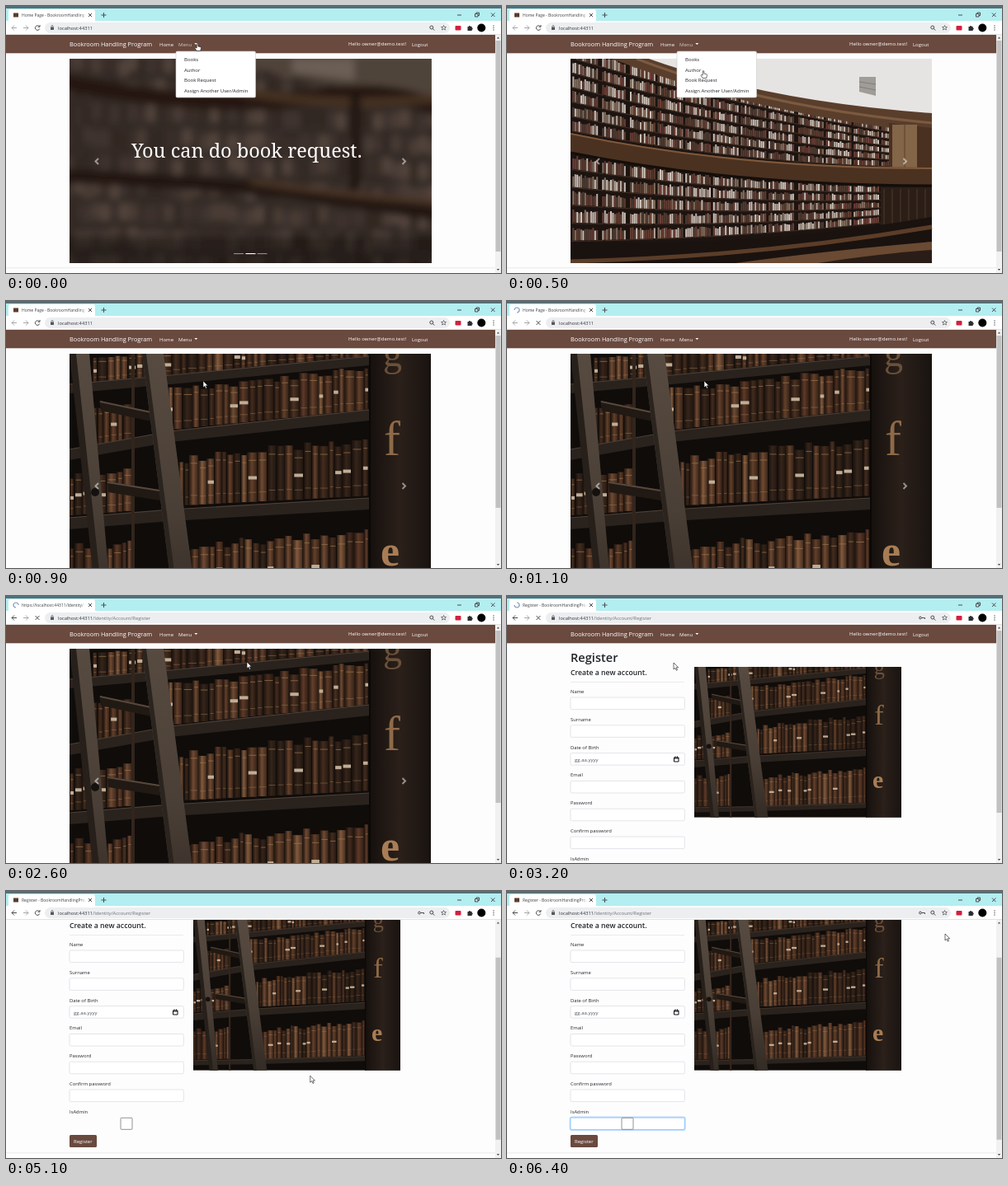
Animation, 600 px wide and 324 px high, one loop 6500 ms. Source, as an HTML page:

```html
<!DOCTYPE html>
<html lang="en">
<head>
<meta charset="utf-8">
<title>Library site</title>
<style>
  html, body { margin: 0; width: 100%; height: 100%; overflow: hidden; background: #fff; }
  svg { display: block; width: 100vw; height: 100vh; }
  text { font-family: "Open Sans", "Noto Sans", sans-serif; white-space: pre; }
  .serif { font-family: "Noto Serif", serif; }
  .gilt { font-family: "Liberation Serif", serif; }
  .field { fill: #fff; stroke: #ced4da; stroke-width: .6; }
  .icon { fill: none; stroke: #4a4d51; stroke-width: 1; }
</style>
</head>
<body>
<svg id="stage" viewBox="0 0 600 324" preserveAspectRatio="none"></svg>
<script>
const LOOP = 6500, STEP = 100;
const BRAND = 'Bookroom Handling Program';
const TAB_BRAND = BRAND.replace(/ /g, '');

const random = seed => () => (seed = seed * 16807 % 2147483647) / 2147483647;
const rect = (x, y, w, h, fill, more = '') =>
  `<rect x="${x}" y="${y}" width="${w}" height="${h}" fill="${fill}" ${more}/>`;
const path = (d, fill, more = '') => `<path d="${d}" fill="${fill}" ${more}/>`;
const line = (d, color, width, more = '') =>
  path(d, 'none', `stroke="${color}" stroke-width="${width}" ${more}`);
const text = (x, y, size, str, fill = '#212529', more = '') =>
  `<text x="${x}" y="${y}" font-size="${size}" fill="${fill}" ${more}>${str}</text>`;

// A row of leather spines standing on a sloping shelf.
function spines(seed, x0, y0, x1, y1, h0, h1) {
  const rnd = random(seed);
  const tones = ['#63402b', '#704a33', '#4b3122', '#35251b', '#835a3d', '#5d3a28', '#432c1f'];
  let out = '', x = x0;
  while (x < x1 - 3) {
    const w = Math.min(6 + rnd() * 7, x1 - x), u = (x - x0) / (x1 - x0);
    const base = y0 + (y1 - y0) * u;
    const h = (h0 + (h1 - h0) * u) * (.84 + rnd() * .16);
    out += rect(x, base - h, w - 1, h, tones[rnd() * tones.length | 0]);
    out += rect(x, base - h, w - 1, h, 'url(#round)');
    out += rect(x + 1.5, base - h * .85, w - 3, 1, '#9a7850', 'opacity=".7"');
    out += rect(x + 1.5, base - h * .2, w - 3, 1, '#9a7850', 'opacity=".5"');
    if (rnd() < .25) out += rect(x + 1, base - h * .52, w - 2, 4, '#bfae96');
    x += w;
  }
  return out;
}

function shelf(y0, mid, y1, depth) {
  return path(`M0 ${y0}L123 ${mid}L364 ${y1}v${depth}L123 ${mid + depth}L0 ${y0 + depth}z`, '#2a221d')
    + line(`M0 ${y0}L123 ${mid}L364 ${y1}`, '#4c4037', 1.2);
}

function ladderPhoto() {
  return rect(0, 0, 438, 319, '#0f0c0a')
    + spines(11, 28, 34, 363, 2, 32, 30) + shelf(37, 26, 3, 11)
    + spines(21, 28, 110, 76, 103, 46, 48) + spines(22, 120, 92, 363, 67, 52, 54) + shelf(116, 94, 68, 13)
    + spines(31, 0, 196, 76, 190, 52, 54) + spines(32, 133, 184, 363, 172, 60, 76) + shelf(199, 189, 175, 14)
    + spines(41, 0, 296, 76, 294, 66, 68) + spines(42, 133, 295, 363, 287, 64, 80) + shelf(298, 296, 289, 10)
    + rect(75, 0, 4, 319, '#32251c')
    + rect(363, 0, 75, 319, 'url(#post)') + rect(363, 0, 2, 319, '#0b0807')
    + text(380, 15, 46, 'g', '#6a503a', 'class="gilt"')
    + text(381, 123, 60, 'f', '#8f6a48', 'class="gilt"')
    + text(377, 257, 52, 'e', '#a87d55', 'class="gilt" font-weight="bold"')
    + path('M36 57L122 75V87L38 69z', '#211913') + line('M37 58L122 76', '#57483c', 2)
    + path('M46 155L134 169V182L47 168z', '#211913') + line('M46 156L134 170', '#57483c', 2)
    + path('M0 0H24L52 319H34z', '#261f1a') + path('M8 0H24L52 319H42z', 'url(#rail)')
    + path('M88 0H114L156 319H128z', 'url(#rail)') + path('M88 0H93L134 319H128z', '#2b241e')
    + '<circle cx="31" cy="168" r="5" fill="#15110e"/>';
}

// Thin spines of one curved bookcase, grouped into one path per tone.
function bank(seed, rows, xEnd, top, bottom) {
  const rnd = random(seed);
  const tones = ['#b9aca3', '#85705f', '#5f3d30', '#cdc2b8', '#6d3f38', '#4f3d33'];
  const strokes = tones.map(() => '');
  let boards = '';
  for (let r = 0; r < rows; r++) {
    const level = (x, k) => top(x) + (bottom(x) - top(x)) * k / rows;
    for (let x = 1; x < xEnd; x += 2.4) {
      const y = level(x, r + .93), h = (level(x, r + 1) - level(x, r)) * (.55 + rnd() * .22);
      if (x % 34 > 3) strokes[rnd() * tones.length | 0] += `M${x.toFixed(1)} ${y.toFixed(1)}v${(-h).toFixed(1)}`;
      if (x % 20 < 2.4) boards += `M${x} ${level(x, r + .97)}L${x + 20} ${level(x + 20, r + .97)}`;
    }
  }
  return line(boards, '#3f2a1e', 1.2) + strokes.map((d, i) => line(d, tones[i], 2)).join('');
}

function hallPhoto() {
  const arc = (left, right, sag) => x => {
    const u = x / 438;
    return left + (right - left) * u + sag * u * (1 - u);
  };
  const top = arc(-18, 90, 30), mid = arc(88, 132, 40), low = arc(113, 154, 40), floor = arc(222, 192, 24);
  return rect(0, 0, 438, 248, '#1c1411')
    + bank(5, 6, 386, top, mid) + bank(9, 5, 374, low, floor)
    + path('M50 0H438V90Q220 66 50 0z', '#5a3e2c') + path('M95 0H438V66Q240 52 95 0z', '#e6e4e3')
    + line('M80 0Q230 58 438 78', '#7b5a40', 3)
    + path('M350 22h20v23l-20-5z', '#a09c98') + line('M350 28l20 3M350 34l20 4', '#817d79', 1)
    + path('M386 78L438 84V134H386z', '#4a3020') + path('M390 80h30v52h-30z', '#836548')
    + line('M405 80v52', '#5b412d', 1)
    + path('M0 90Q200 132 438 132V154Q200 154 0 114z', '#4b3120')
    + line('M0 91Q200 133 438 133', '#7d583b', 2) + line('M0 114Q200 154 438 154', '#140e0b', 3)
    + path('M376 156H438V210H376z', '#2b1e17')
    + line('M380 158v46M390 158v46M400 158v46M410 158v46M420 158v46M430 158v46', '#4d392c', 1)
    + path('M0 222Q220 230 438 192V248H0z', '#1a120f')
    + line('M0 246Q230 240 438 204', '#5b3d28', 5)
    + path('M200 248Q300 234 438 222V240L330 248z', '#6a4a33')
    + path('M300 248Q380 236 438 232V248z', '#2a1d17');
}

function blurPhoto() {
  const rnd = random(77);
  const tones = ['#4f403a', '#5c4b43', '#3d302c', '#66544b', '#463833'];
  let out = rect(-20, -20, 480, 290, '#41342f');
  for (let y = -8; y < 248; y += 30)
    for (let x = -6; x < 438; x += 11)
      out += rect(x, y + x * .02 + rnd() * 8, 11, 20, tones[rnd() * tones.length | 0]);
  out += path('M225 -10H460V45Q320 38 225 10z', '#635448')
    + path('M270 0H345V26L270 16z', '#85766a')
    + line('M-10 28Q180 64 290 47T460 68', '#2e1f17', 20)
    + line('M210 40Q330 62 460 46', '#573c2a', 11)
    + line('M-10 142Q210 152 300 166T460 190', '#2b1d17', 17)
    + line('M220 149Q330 166 460 175', '#5a3f2d', 7)
    + rect(340, 45, 13, 115, '#2a1e19')
    + rect(-20, 215, 480, 50, '#1d1613', 'opacity=".5"');
  return `<g filter="url(#soft)">${out}</g>` + rect(0, 0, 438, 248, '#000', 'opacity=".2"')
    + text(75, 120, 23.5, 'You can do book request.', '#fff', 'class="serif"')
    + rect(199, 236, 12, 1.1, '#fff', 'opacity=".5"') + rect(213.5, 236, 12, 1.1, '#fff')
    + rect(227.5, 236, 12, 1.1, '#fff', 'opacity=".5"');
}

function homePage() {
  return `<g id="home">
    <g clip-path="url(#frame)">
      <g id="slide0" clip-path="url(#wide)">${blurPhoto()}</g>
      <g id="slide1" clip-path="url(#wide)">${hallPhoto()}</g>
      <g id="slide2"><use href="#ladder"/></g>
    </g>
    <g id="arrows" fill="none" stroke="#fff" stroke-width="2" opacity=".5">
      <path d="M112 -3.5L108.500 0L112 3.5M480.500 -3.5L484 0L480.500 3.5"/></g>
    <g id="footer">${rect(0, 317.5, 593, .7, '#dee2e6')}</g></g>`;
}

function registerPage() {
  const labels = ['Name', 'Surname', 'Date of Birth', 'Email', 'Password', 'Confirm password', 'IsAdmin'];
  const fields = labels.map((label, i) => {
    const y = 118 + i * 33.8;
    return text(77, y, 5.85, label)
      + (i < 6 ? `<rect class="field" x="77" y="${y + 5}" width="138.300" height="14.600" rx="1.600"/>` : '');
  }).join('');
  return `<g id="register">
    ${text(77, 80, 14.6, 'Register', '#212529', 'font-weight="600"')}
    ${text(77, 95.5, 8.7, 'Create a new account.', '#212529', 'font-weight="600"')}
    ${rect(77, 104, 138, .6, '#dfdfdf')}${fields}
    ${text(82, 200.5, 6, 'gg.aa.yyyy', '#495057')}
    <path d="M202.500 196h5.500v5h-5.500zM202.500 197h5.500M204 194.500v1.500M206.500 194.500v1.500" fill="none" stroke="#111"/>
    <g id="focus"><rect x="76.500" y="325.500" width="139.300" height="15.600" rx="2" fill="#fff" stroke="#bfdeff" stroke-width="2"/>
      <rect x="77" y="326" width="138.300" height="14.600" rx="1.600" fill="none" stroke="#80bdff" stroke-width=".6"/></g>
    <rect x="139" y="326.300" width="14" height="14" rx="1" fill="#fff" stroke="#767676" stroke-width=".8"/>
    <g id="tick">${rect(139, 326.3, 14, 14, '#0b75e0', 'rx="1"')}${line('M142 333.500l3 3l5.500-6.500', '#fff', 1.8)}</g>
    ${rect(77, 347, 33, 15, '#6a493e', 'rx="1.600"')}${text(82, 356.7, 6, 'Register', '#fff')}
    ${rect(0, 368.5, 593, .7, '#dee2e6')}
    <use href="#ladder" transform="translate(227 86) scale(.573)"/></g>`;
}

function navbar() {
  const items = ['Books', 'Author', 'Book Request', 'Assign Another User/Admin'];
  return rect(0, 34, 593, 23, '#6a493e') + rect(0, 57, 593, 1, '#6a493e', 'opacity=".3"')
    + text(77, 49, 7.35, BRAND, '#fff')
    + text(186, 48.6, 6, 'Home', '#fff') + text(209, 48.6, 6, 'Menu', '#fff', 'id="menuLabel"')
    + path('M228.300 45h4l-2 2z', '#fff')
    + text(415, 48.2, 6.1, 'Hello owner@demo.test!', '#fff') + text(492, 48.6, 6, 'Logout', '#fff')
    + `<g id="menu"><rect x="206" y="55" width="96.500" height="56" rx="1.500" fill="#fff" stroke="#c9c9c9" stroke-width=".6"/>
      <g id="hover">${rect(206.3, 96, 95.9, 12.2, '#f8f9fa')}</g>
      ${items.map((s, i) => text(216, 67 + i * 12.5, 6, s)).join('')}</g>`;
}

function browser() {
  return rect(0, 0, 600, 3, '#566f78') + rect(0, 3, 600, 15, '#b3eef1')
    + path('M3 18V6.500Q3 4 5.500 4H105Q108 4 108 7V18z', '#fff')
    + '<g clip-path="url(#tabClip)">' + text(19, 13, 5, '', '#3c4043', 'id="tabTitle"') + '</g>'
    + rect(90, 6, 7, 10, 'url(#fade)')
    + '<g id="favicon">' + rect(9, 8.5, 6, 5, '#5b3b2d') + '</g>'
    + line('M0 -3A3 3 0 1 1 -3 0', '#7d95bd', 1.2, 'id="spinner"')
    + `<path class="icon" d="M100 9l4 4m0-4l-4 4M115.500 11h6m-3-3v6M547 11h5M568.500 9.500h3.500v3.500h-3.500zM570 9.500v-1.500h3.500v3.500h-1.500M588 8.500l4.500 4.500m0-4.500l-4.500 4.500"/>`
    + rect(0, 18, 600, 16, '#fff') + rect(0, 34, 600, 1, '#e4e1e0')
    + rect(47, 20, 491, 13, '#eceef0', 'rx="6.500"')
    + `<path id="back" fill="none" d="M13 26.500H7m3-3l-3 3l3 3"/><path class="icon" style="stroke:#a5a7aa" d="M21 26.500h6m-3-3l3 3l-3 3"/>
      <path id="reload" class="icon" d="M40.500 25A2.800 2.800 0 1 0 40.800 27.500M41 23v2.300h-2.300"/>
      <path id="stop" class="icon" d="M35.500 24l5 5m0-5l-5 5"/>`
    + rect(54, 25.5, 4, 3.5, '#55585c') + line('M55 25.500v-1a1 1 0 0 1 2 0v1', '#55585c', .7)
    + `<text x="63" y="28.600" font-size="5.750" fill="#303338">localhost:44311<tspan id="route" fill="#6c7075"></tspan></text>
      <g id="key"><circle class="icon" cx="501" cy="26.500" r="1.400"/><path class="icon" d="M502.500 26.500h4v1.500"/></g>
      <circle class="icon" cx="515.800" cy="26" r="2"/><path class="icon" d="M517.300 27.500l2 2"/>
      <path class="icon" style="stroke-width:.7" d="M530.500 23.500l.9 2h2.100l-1.600 1.400l.6 2.100l-2-1.200l-2 1.200l.6-2.100l-1.600-1.400h2.100z"/>`
    + rect(544.5, 24, 7, 5.5, '#d3203c', 'rx="1"')
    + path('M559.500 25h1.500a1.100 1.100 0 0 1 2.200 0h1.500v1.500a1.100 1.100 0 0 1 0 2.200v1.300h-5.200z', '#2b2d30')
    + '<circle cx="576.300" cy="26.500" r="5" fill="#000"/>'
    + [24, 26.5, 29].map(y => `<circle cx="591" cy="${y}" r=".7" fill="#4a4d51"/>`).join('');
}

const stage = document.getElementById('stage');
stage.innerHTML = `<defs>
    <linearGradient id="post"><stop stop-color="#15100d"/><stop offset=".5" stop-color="#2b201a"/><stop offset="1" stop-color="#191310"/></linearGradient>
    <linearGradient id="rail" x2="0" y2="1"><stop stop-color="#574b41"/><stop offset=".6" stop-color="#4a3f36"/><stop offset="1" stop-color="#332b25"/></linearGradient>
    <linearGradient id="round"><stop stop-color="#120b07" stop-opacity=".8"/><stop offset=".45" stop-color="#120b07" stop-opacity="0"/><stop offset="1" stop-color="#120b07" stop-opacity=".55"/></linearGradient>
    <linearGradient id="fade"><stop stop-color="#fff" stop-opacity="0"/><stop offset="1" stop-color="#fff"/></linearGradient>
    <filter id="soft" x="-5%" y="-5%" width="110%" height="110%"><feGaussianBlur stdDeviation="4"/></filter>
    <clipPath id="frame"><rect x="77" y="64" width="439" height="320"/></clipPath>
    <clipPath id="wide"><rect width="439" height="248"/></clipPath>
    <clipPath id="whole"><rect width="438" height="319"/></clipPath>
    <clipPath id="tabClip"><rect x="18" y="4" width="79" height="14"/></clipPath>
    <g id="ladder" clip-path="url(#whole)">${ladderPhoto()}</g></defs>`
  + rect(0, 0, 600, 324, '#fefdfd')
  + `<g id="page">${homePage()}${registerPage()}${navbar()}</g>`
  + rect(593, 34, 7, 290, '#f1f1f1') + rect(593.5, 42, 6, 250, '#c1c1c1', 'id="thumb"')
  + path('M594.800 39.500l1.700-2l1.700 2zM594.800 319l1.700 2l1.700-2z', '#505050')
  + browser()
  + `<g id="cursor"><path id="arrow" d="M0 0V8L1.900 6.300L3.200 9.200L4.500 8.600L3.200 5.800H5.700z" fill="#fff" stroke="#111" stroke-width=".6"/>
    <path id="hand" d="M-.8 1Q0 -.3 .8 1V4L3.800 4.700Q4.700 5 4.400 6.500L3.700 9.500H-.8L-3 6.300Q-3 5 -.8 6z" fill="#fff" stroke="#111" stroke-width=".6"/></g>`;

const el = Object.fromEntries([...stage.querySelectorAll('[id]')].map(n => [n.id, n]));
const show = (node, on) => node.setAttribute('visibility', on ? 'inherit' : 'hidden');
const move = (node, x, y) => node.setAttribute('transform', `translate(${x} ${y})`);

// Rows of time followed by values, joined by straight moves.
const POINTER = [[0, 232, 45], [300, 235, 58], [700, 241, 98], [800, 239, 97], [2100, 239, 97], [2600, 292, 80],
  [2900, 284, 82], [3200, 202, 81], [3500, 215, 82], [3900, 597, 102], [4000, 598, 102], [4300, 598, 122],
  [4600, 598, 140], [4800, 590, 150], [5000, 443, 205], [5400, 146, 282], [5800, 146, 282], [6300, 518, 58], [6400, 531, 52]];
const SCROLL = [[4000, 0], [4300, 27], [4600, 51]];
const SLIDE = [[0, 0], [100, .5], [200, 1], [600, 1], [700, 1.1], [800, 2]];

function sample(rows, t) {
  const next = rows.findIndex(row => row[0] > t);
  if (next < 0) return rows.at(-1).slice(1);
  if (next === 0) return rows[0].slice(1);
  const a = rows[next - 1], b = rows[next], u = (t - a[0]) / (b[0] - a[0]);
  return a.slice(1).map((v, i) => v + (b[i + 1] - v) * u);
}

function render(t) {
  const [scroll] = sample(SCROLL, t), [slide] = sample(SLIDE, t), [x, y] = sample(POINTER, t);
  const registered = t >= 2900, routed = t >= 2200, loading = t >= 1000 && t < 3500;
  const tall = t >= 700, menuOpen = t < 900;

  move(el.page, 0, -scroll);
  show(el.home, !registered);
  show(el.register, registered);
  [el.slide0, el.slide1, el.slide2].forEach((node, i) => {
    move(node, 77 + (i - slide) * 438, 64);
    show(node, !registered && Math.abs(i - slide) < 1);
  });
  move(el.arrows, 0, tall ? 224.5 : 188.5);
  show(el.arrows, !registered && Number.isInteger(slide));
  show(el.footer, !registered && !tall);

  show(el.menu, menuOpen);
  show(el.hover, menuOpen && y > 92);
  el.menuLabel.setAttribute('fill', menuOpen ? '#d3c8c4' : '#fff');
  show(el.focus, registered && t >= 5400);
  show(el.tick, t >= 5400 && t < 5800);

  el.tabTitle.textContent = registered ? 'Register - ' + TAB_BRAND
    : routed ? 'https://localhost:44311/Identity/' : 'Home Page - ' + TAB_BRAND;
  el.route.textContent = routed ? '/Identity/Account/Register' : '';
  el.back.setAttribute('stroke', routed ? '#4a4d51' : '#a5a7aa');
  show(el.favicon, !loading);
  show(el.spinner, loading);
  el.spinner.setAttribute('transform', `translate(12 11) rotate(${t * .9 % 360})`);
  show(el.stop, loading);
  show(el.reload, !loading);
  show(el.key, registered);

  el.thumb.setAttribute('y', 42 + scroll * .76);
  el.thumb.setAttribute('height', registered ? 221 : tall ? 209 : 256);
  el.thumb.setAttribute('fill', t >= 4000 && t < 4700 ? '#787878' : '#c1c1c1');

  move(el.cursor, x, y);
  show(el.hand, menuOpen);
  show(el.arrow, !menuOpen);
}

const start = performance.now();
function tick() {
  const t = (performance.now() - start) % LOOP;
  render(Math.floor(t / STEP) * STEP);
  requestAnimationFrame(tick);
}
tick();
</script>
</body>
</html>
```
